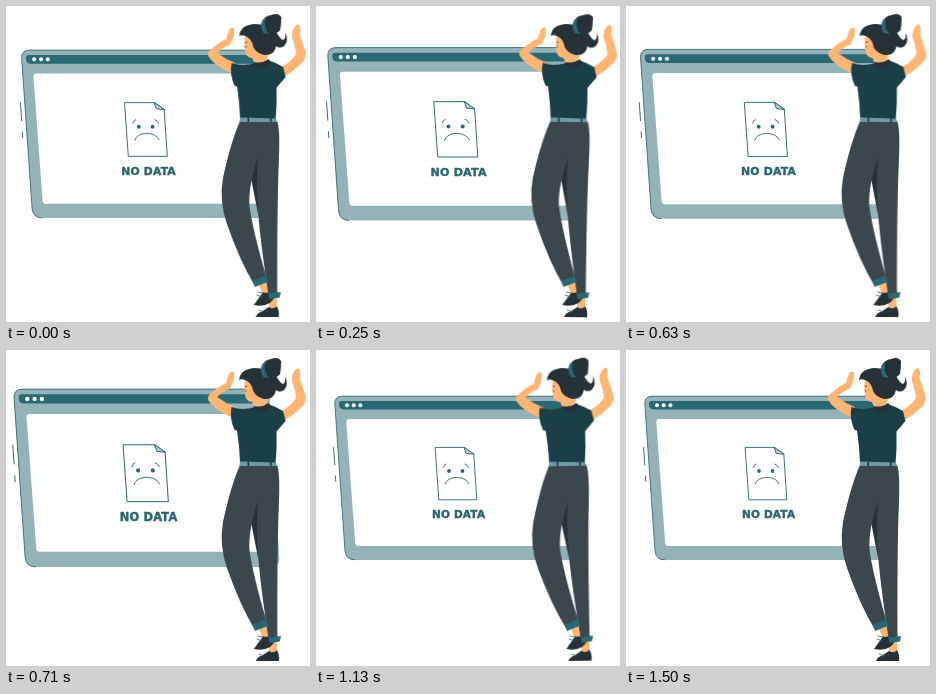
These frames come from a looping animation (304 px wide and 316 px high, 1.54 s). An HTML page:

```html
<!DOCTYPE html>
<html lang="en">
<head>
<meta charset="utf-8">
<title>No data</title>
<style>
  html, body { margin: 0; width: 100%; height: 100%; overflow: hidden; background: #fff; }
  svg { display: block; width: 100vw; height: 100vh; }
  #panel { transform-origin: 143px 128px; }
  #woman { transform-origin: 251px 160px; }
  text { font: 700 10.500px "DejaVu Sans", sans-serif; letter-spacing: .2px; fill: #2a6570; stroke: #2a6570; stroke-width: .4; }
  .line { fill: none; stroke: #2a6570; stroke-linecap: round; stroke-linejoin: round; }
  .teal { fill: #2a6873; }
  .skin { fill: #ffb573; }
  .dark { fill: #263238; }
  .shirt { fill: #1b3f47; }
  .cloth { fill: #3b474c; }
</style>
</head>
<body>
<svg viewBox="0 0 304 316">
  <g id="panel">
    <path fill="#94b3b9" d="M26.500 46H246Q253 46 254 54L263 202Q263 210 255 210H38.500Q30 210 29 201L18.800 54Q18.500 46 26.500 46Z"/>
    <path class="line" stroke-width=".8" d="M246 46.200H26.500Q18.500 46.200 18.800 54L29 201Q30 209.800 38.500 209.800"/>
    <path class="teal" d="M26.500 51H246Q249 51 249.400 55T247 59.400H27.500Q23.500 59.400 23 55T26.500 51Z"/>
    <g fill="#fff">
      <circle cx="31" cy="55.200" r="2"/>
      <circle cx="37.700" cy="55.200" r="2"/>
      <circle cx="44.400" cy="55.200" r="2"/>
      <path d="M33 69H245Q248 69 248.300 72L256 193Q256 196 253 196H42.500Q39.500 196 39.200 193L30.300 72Q30.300 69 33 69Z"/>
    </g>
    <path class="line" stroke-width=".9" d="M17.600 97.500L18.800 115M19.400 126L19.800 131.500"/>
    <g class="line" stroke-width=".9">
      <path d="M119.500 97.400H148L157.800 104.200L160.800 149.800H123.200Z"/>
      <path fill="#b9ced2" d="M148 97.400L150.200 103.500L157.800 104.200Z"/>
      <path d="M127.200 117.400Q127.800 115 130 114M148.800 114Q151.500 115 152.400 117.600"/>
      <path d="M129.300 134C131.500 125.500 149 124.800 152.800 133.600"/>
    </g>
    <g class="teal">
      <circle cx="133" cy="121" r="1.900"/>
      <circle cx="146.500" cy="121" r="1.900"/>
    </g>
    <text x="142.600" y="167.800" text-anchor="middle">NO DATA</text>
  </g>

  <g id="woman">
    <g class="skin">
      <path d="M222.500 25Q224 20.500 228 22Q228.500 30 226 34L224 38.500Q217 41 211 47Q219 53 229 57L226 67.500Q208 60 202 50Q201 47 204 44Q213 36 220 33Q221 29 222.500 25Z"/>
      <path d="M286 26Q288 19 292 18Q295 20 293.500 28L299.500 46Q300.500 51 296.500 56Q289 64 279 70L275 61Q285 56 290 48Q289 41 288 37Q285 31 286 26Z"/>
      <path d="M253 279L262 276L266 285L257 289Z"/>
      <path d="M263 290H271V303H263Z"/>
    </g>

    <path class="dark" d="M250 311Q251 307 257 305L263 301Q268 304 271 300Q274 305 273 311Z"/>
    <path class="dark" d="M248 299Q253 292 257 286.500Q263 288 269 282.500L271.500 286Q269 293 264 297Q258 301 248 299Z"/>
    <path class="line" stroke-width=".8" d="M251 289L256 291M252 286L257 287M253 304L258 306"/>

    <path class="dark" d="M252 146L245 172L252.500 210L256 180Z"/>
    <path class="cloth" d="M247 115H271Q274 122 273 150Q271 200 271.500 289L263 291Q255 240 252 205Q250 180 252 150Z"/>
    <path class="cloth" d="M234 115Q225 135 217 172Q213 195 221 218Q234 255 248.500 279L260.500 271Q247 225 243.500 200Q242 180 253 148L262 115Z"/>
    <path class="teal" d="M247 275L260.500 269L262 276L249 281Z"/>
    <path class="teal" d="M262.500 287.500L275 286L274 291.500L263.500 293Z"/>

    <path class="skin" d="M239 30Q237.500 39 239 45Q240 52 246 52L249 59L256 61L262 50L252 28Z"/>
    <path class="shirt" d="M225.500 57Q236 61 249 57L254 60L263 54.500Q271 57 277 61L279.500 71L270.500 81.500Q271 98 269.500 114L234 112.500Q233.500 97 231 80.500L228.500 80Q223 68 225.500 57Z"/>
    <path class="dark" d="M248 56Q256 58 262 53L265 56L262 61Q254 63 247.500 60Z"/>
    <path fill="#6a9aa3" d="M234 111.500L270 112.500L271 116H233.500Z"/>
    <path class="dark" d="M241.500 111.500H243V116H241.500ZM264 112H265.500V116H264Z"/>

    <path class="dark" d="M233 30Q234 19 248 18Q262 18 270 26Q274 33 277 34Q280 32 279 26Q283 35 278 40Q273 43 270 40Q268 50 258 49Q250 47 247 41Q246 34 241 31Q236 28 233 30Z"/>
    <path class="dark" d="M256 16Q258 10 265 9Q272 6 275 11Q275 19 274 24Q270 29 263 27Q255 25 256 16Z"/>
    <path class="teal" d="M257 13Q252.500 19 257 27L263 28Q257 22 259 13Z"/>
    <path fill="none" stroke="#263238" stroke-width=".8" d="M239 36.500L241 36M239.700 40V41.500"/>
  </g>
</svg>
<script>
  const timing = { duration: 1540, delay: -38, iterations: Infinity, easing: 'linear' };

  function loop(id, steps, toTransform) {
    const frames = steps.map(([offset, value]) => ({ offset, transform: toTransform(value) }));
    document.getElementById(id).animate(frames, timing);
  }

  // Double heartbeat, then rest.
  loop('panel',
    [[0, 1], [.1, 1.1], [.3, 1], [.4, 1], [.5, 1.1], [.585, 1], [1, 1]],
    s => `scale(${s})`);

  // Gentle sway about the waist.
  loop('woman',
    [[0, 0], [.25, 1], [.75, -1], [1, 0]],
    a => `rotate(${a}deg)`);
</script>
</body>
</html>
```
